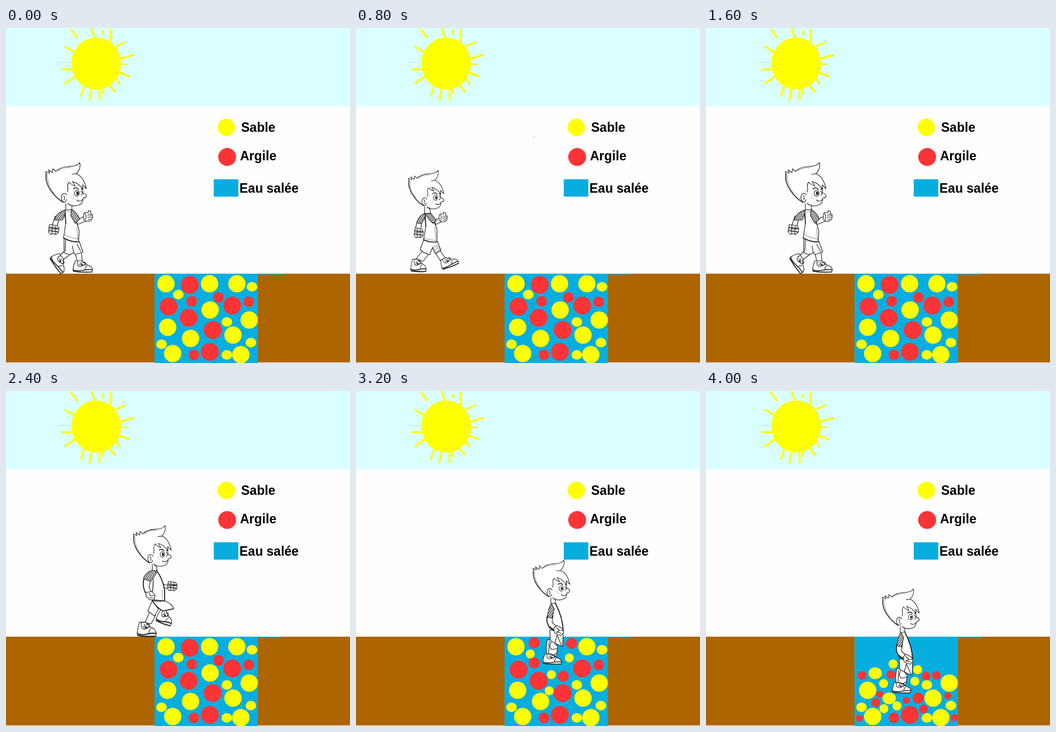
Animation, 616 px wide and 600 px high, one loop 4.8 s. Source, as an HTML page:

```html
<!DOCTYPE html>
<html lang="fr">
<head>
<meta charset="utf-8">
<title>Sable, argile, eau salée</title>
<style>
html, body { margin: 0; width: 100%; height: 100%; overflow: hidden; background: #fefefe; }
svg { display: block; width: 616px; height: 600px; }
text { font: bold 23px "Liberation Sans", Arial, sans-serif; }
.rays { stroke: #ff0; stroke-width: 3.5; fill: none; }
.ink { fill: #fff; stroke: #262626; stroke-width: 1.15; stroke-linecap: round; stroke-linejoin: round; }
.line { fill: none; }
.bold { fill: none; stroke-width: 1.7; }
.fine { fill: none; stroke: #555; stroke-width: .7; }
.sleeve { fill: url(#hatch); }

.step, .dry, .wade { animation: step 4.8s step-end infinite; visibility: hidden; }
.step { animation-delay: calc(var(--i) * .8s - 4.8s); }
.dry { animation-name: dry; }
.wade { animation-name: wade; }
@keyframes step { 0% { visibility: visible } 16.6667%, 100% { visibility: hidden } }
@keyframes dry { 0% { visibility: visible } 66.6667%, 100% { visibility: hidden } }
@keyframes wade { 0% { visibility: visible } 83.3333%, 100% { visibility: hidden } }
</style>
</head>
<body>
<svg viewBox="0 0 616 600">
<defs>
  <pattern id="hatch" width="3" height="3" patternUnits="userSpaceOnUse" patternTransform="rotate(35)">
    <rect width="3" height="3" fill="#ddd"/><path d="M0 0V3" stroke="#333" stroke-width="2.2"/>
  </pattern>

  <g id="head">
    <path stroke="none" d="M72 260C70 278 80 296 102 313L112 316Q122 322 134 315L139 305Q147 301 142 297L138 287L144 287L134 264L132 243Q112 246 90 256Z"/>
    <path class="bold" d="M72 261C70 274 75 285 84 296Q92 306 102 312"/>
    <path class="line" d="M72 261L71 257L78 260L76 254L83 259L84 252L89 257Q97 249 112 248Q128 248 132 241Q135 251 126 261Q139 266 144 288L137 281L137 289Q131 278 119 275L124 283Q117 281 113 276Q109 280 111 287L110 294"/>
    <path class="line" d="M126 261L118 262M137 288L138 296Q144 297 144 301Q143 305 138 304M138 306Q138 313 133 316Q120 322 110 314"/>
    <path class="line" d="M109 299Q104 293 100 299Q97 306 102 311Q107 314 108 307M103 300Q106 302 104 308"/>
    <path class="fine" d="M74 262Q73 279 86 296M92 256Q103 249 116 250M117 302l1 1m2-3l1 1m-1 4l1 0"/>
    <path class="bold" d="M121 288Q126 284 130 289M135 289l3-2"/>
    <ellipse cx="127" cy="296" rx="4.3" ry="5.2"/><path class="line" d="M134 292Q139 295 135 300"/>
    <ellipse cx="128" cy="296" rx="1.6" ry="2.4" fill="#222"/>
    <path class="line" d="M128 309Q134 312 138 306M127 308l2 2"/>
  </g>

  <g id="shoe">
    <path d="M4 1Q1 8 0 16L1 20Q17 22 34 21Q37 14 30 10Q23 8 18 3L16 1Z"/>
    <path class="bold" d="M0 17Q6 20 17 18T35 17M1 20Q18 22 34 21"/>
    <path class="line" d="M8 2Q6 10 13 11L22 8M11 7l8 2M13 4l5 5M17 4q6-2 6 2q-3 4-8 3M25 10q-4 3-3 7"/>
  </g>

  <g id="fist">
    <path d="M1 10Q0 4 5 3L9 4L10 0L14 1L13 5Q18 6 17 11Q17 17 11 19Q4 20 1 16Z"/>
    <path class="line" d="M3 5q4 4 1 12M8 8q4-1 8 1M8 12q4-1 8 0M9 16l5-1"/>
  </g>

  <g id="glove">
    <path d="M2 0L16 2L19 7L18 14L13 18L8 16L4 18L0 13Z"/>
    <path class="bold" d="M1 5L18 7M1 11L17 13"/>
    <path class="line" d="M7 1L6 16M13 3L12 17M2 8h15"/>
  </g>

  <g id="stride" class="ink">
    <path d="M107 313V326H118V318Z"/>
    <path d="M106 398L95 409L101 416L117 404ZM124 402L128 421H137L135 402Z"/>
    <use href="#shoe" transform="matrix(.6 .8 -.78 .6 94 400)"/>
    <use href="#shoe" x="120" y="416"/>
    <path d="M104 376L104 402Q113 409 122 402L124 406L138 401L131 382Z"/>
    <path class="line" d="M121 402L119 390M107 378L106 400M127 387l7 13"/>
    <path d="M88 337L82 356L91 358L95 341Z"/>
    <use href="#glove" x="76" y="352"/>
    <path d="M105 326L107 350L103 376Q117 384 130 383L131 363L125 344L118 325Z"/>
    <path class="bold" d="M103 376Q117 384 130 383M106 330L107 350"/>
    <path class="sleeve" d="M106 326Q91 330 87 344L101 344L106 333Z"/>
    <path d="M126 344L128 352L143 346L139 338Z"/>
    <path class="sleeve" d="M117 325Q126 329 132 342L124 350L116 336Z"/>
    <use href="#fist" x="138" y="327"/>
    <path class="fine" d="M105 328Q112 331 119 326M127 358l2 22M105 370q12 7 25 8"/>
    <use href="#head"/>
  </g>

  <g id="reach" class="ink">
    <path d="M123 318V333H133V325Z"/>
    <path d="M120 398L108 413L120 418L131 404ZM141 400L151 417L160 412L150 398Z"/>
    <use href="#shoe" transform="translate(98 413) scale(.79 1.1)"/>
    <use href="#shoe" transform="translate(148 416) rotate(-23) scale(.9)"/>
    <path d="M121 380L115 397Q122 404 132 406L137 393L142 404L152 398L146 383Z"/>
    <path class="sleeve" d="M137 393l5 11l10-6l-8-9Z" opacity=".35"/>
    <path d="M110 345L106 361L115 363L118 348Z"/>
    <use href="#glove" transform="translate(104 358) scale(.88 1)"/>
    <path d="M123 332L125 355L121 379Q133 385 145 383L145 360L134 332Z"/>
    <path class="bold" d="M121 379Q133 385 145 383M124 336L125 356"/>
    <path class="sleeve" d="M123 332Q112 336 109 349L117 351L124 339Z"/>
    <path d="M140 344L143 352L153 347L149 341Z"/>
    <path class="sleeve" d="M124 333L134 332L144 345L138 350L131 343Z"/>
    <use href="#fist" transform="translate(148 330) scale(.9)"/>
    <path class="fine" d="M123 376q11 5 22 4M141 357l2 20"/>
    <use href="#head" transform="translate(32 40.5) scale(.87 .89)"/>
  </g>

  <g id="lift" class="ink">
    <path d="M262 308V323H270V315Z"/>
    <path d="M258 394L249 415L260 417L268 401Z"/>
    <use href="#shoe" transform="translate(235 413) scale(.97 1.25)"/>
    <path d="M262 375L254 394L266 403L273 391Z"/>
    <use href="#shoe" transform="translate(275 389) rotate(18) scale(.82 1.15)"/>
    <path d="M262 376Q272 390 281 394L300 390Q298 381 284 376Z"/>
    <path class="bold" d="M262 376Q272 390 281 394L300 390"/>
    <path d="M281 346L294 349V355L282 352Z"/>
    <use href="#glove" transform="translate(289 341) scale(.92 .95)"/>
    <path d="M262 322L264 345L261 374Q274 379 284 375L284 356Q280 335 270 322Z"/>
    <path class="bold" d="M284 375L284 356Q280 335 270 322M262 374L284 376"/>
    <path d="M247 336Q243 350 251 364L261 362L256 351L259 340Z"/>
    <path class="bold" d="M247 336Q243 350 251 364"/>
    <path class="sleeve" d="M262 321Q250 325 246 336L259 341L267 330L271 323Z"/>
    <path d="M250 361L261 359L267 366L265 374L258 374L251 368Z"/>
    <path class="line" d="M256 362l3 5l6-1M258 370l5 1"/>
    <path class="fine" d="M262 342V358M280 355v18"/>
    <use href="#head" transform="translate(162 14.5) scale(.93 .94)"/>
  </g>

  <g id="stand" class="ink">
    <path d="M349 368V383H357V374Z"/>
    <path d="M343 445Q339 459 342 473L359 475L361 458L353 447Z"/>
    <use href="#shoe" transform="translate(334.500 470) scale(.96 .9)"/>
    <path class="line" d="M350 449q-6 10 1 14l9-2M344 470q8 5 15 0M346 448l-1 22"/>
    <path d="M347 428L348 447L357 452L370 458L371 432Z"/>
    <path class="line" d="M356 452L360 437L368 456"/>
    <path d="M350 381L346 424Q358 434 371 431Q371 407 357 380Z"/>
    <path class="bold" d="M371 431Q371 407 357 380"/>
    <path d="M344 400Q339 410 345 421L356 429L360 423L351 414L353 402Z"/>
    <path class="bold" d="M344 400Q339 410 345 421L354 428"/>
    <path class="sleeve" d="M350 381Q344 388 343 405L351 407L355 390Z"/>
    <path d="M354 425L359 420L369 425L372 432L367 438L356 434Z"/>
    <path class="line" d="M359 424l5 5l6 0M359 431l8 3M364 429l-5 4"/>
    <use href="#head" transform="translate(252.600 81.300) scale(.905 .92)"/>
  </g>
</defs>

<rect width="616" height="140" fill="#d9ffff"/>
<path d="M92 61.500H118" stroke="#c3e6cf" fill="none"/>
<path class="rays" d="M153 0L159 18M116 2L128 18M173.500 5V12M187.500 2V25M196 33L215 25M105 33L123 44M204 55L229 48M99 74H118M203 80L221 87M105 100L124 86M197 89L203 101M185 103L196 115M140 103L134 123M154 106L149 130M167.500 106V130M172 106L174 118"/>
<path class="rays" d="M205 65H218" style="stroke-width:2"/>
<ellipse cx="161.500" cy="63.500" rx="44.500" ry="46.500" fill="#ff0"/>

<circle cx="394.500" cy="178" r="15.500" fill="#ff0"/>
<circle cx="396" cy="231" r="16" fill="#fd3437"/>
<rect x="372" y="271" width="44" height="31" fill="#06aee0"/>
<text x="421" y="186">Sable</text>
<text x="419" y="237">Argile</text>
<text x="418" y="295">Eau salée</text>

<rect y="440" width="616" height="159" fill="#ad6500"/>
<path d="M266 440H493V441.500H451V600H266Z" fill="#06aee0"/>
<g id="pit"></g>

<use class="step" style="--i:0" href="#stride"/>
<g class="step" style="--i:1"><use href="#reach"/><path d="M318 195.500h2" stroke="#777"/></g>
<use class="step" style="--i:2" href="#stride" x="71"/>
<use class="step" style="--i:3" href="#lift"/>
<use class="step" style="--i:4" href="#stand"/>
<use class="step" style="--i:5" href="#stand" x="-1" y="51.500"/>
</svg>

<script>
const NS = "http://www.w3.org/2000/svg";
const pit = document.getElementById("pit");
const sand = "#ff0", clay = "#fd3437";

function layer(cls, i) {
  const g = pit.appendChild(document.createElementNS(NS, "g"));
  if (cls) g.setAttribute("class", cls);
  if (i) g.style.setProperty("--i", i);
  return function grains(fill, rx, ry, ...spots) {
    for (const [cx, cy] of spots) {
      const e = g.appendChild(document.createElementNS(NS, "ellipse"));
      Object.entries({ cx, cy, rx, ry, fill }).forEach(([k, v]) => e.setAttribute(k, v));
    }
    return grains;
  };
}

layer()
  (sand, 15.5, 15.5, [435.5, 523], [289.5, 536], [406.5, 550], [298.5, 583], [420.5, 585])
  (sand, 9.5, 8.5, [395.5, 526.5], [438.5, 563.5], [278.5, 566.5], [395.5, 585.5])
  (clay, 16, 16, [365, 580])
  (clay, 9.5, 9.5, [336.5, 585.5]);

layer("wade")
  (sand, 15.5, 15.5, [286.5, 458], [413.5, 458], [330.5, 556])
  (sand, 9.5, 8.5, [440.5, 463.5])
  (clay, 16, 16, [291, 499], [405, 497], [327, 519], [370, 541])
  (clay, 9.5, 9.5, [434.5, 490.5]);

layer("dry")
  (sand, 15.5, 15.5, [364.5, 458], [365.5, 505])
  (sand, 9.5, 8.5, [308.5, 477.5])
  (clay, 16, 16, [329, 460])
  (clay, 9.5, 9.5, [380.5, 482.5], [332.5, 489.5]);

layer("step", 4)
  (sand, 8, 8, [312, 471], [382, 478], [350, 508], [346, 537])
  (clay, 10, 10, [319, 451], [386, 452], [319, 487], [371, 511]);

layer("step", 5)
  (sand, 12, 10.5, [303, 505.5], [328, 550.5])
  (sand, 8, 8, [335, 489], [379, 499], [318, 524], [374, 520], [342, 564], [318.5, 569])
  (clay, 10, 10, [380, 550])
  (clay, 7.8, 7.8, [279.5, 509.5], [331, 508], [394, 510.5], [412.5, 509.5], [304, 558], [389.5, 569.5])
  (clay, 6.3, 6.3, [311, 543], [358.5, 554], [433, 546], [274.5, 586], [444.5, 585]);
</script>
</body>
</html>
```
